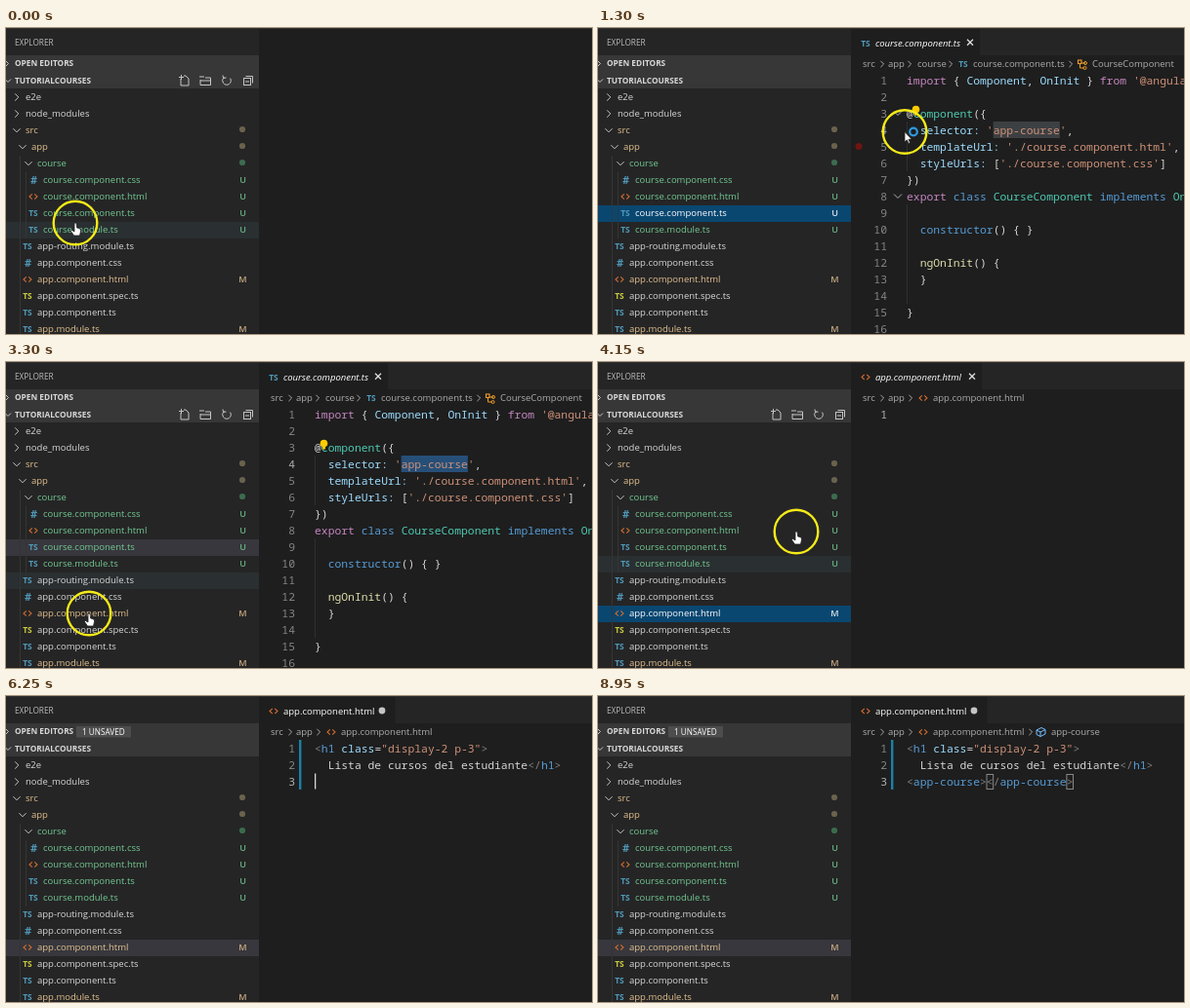
An HTML page with a canvas for the animation above (9000 ms loop, 600 by 314 pixels).

```html
<!DOCTYPE html>
<html lang="es">
<head>
<meta charset="utf-8">
<style>
html, body { margin: 0; width: 100%; height: 100%; overflow: hidden; background: #1e1e1e; }
canvas { display: block; width: 600px; height: 314px; }
</style>
</head>
<body>
<canvas id="stage" width="600" height="314"></canvas>
<script>
const g = document.getElementById('stage').getContext('2d');
const LOOP = 9000, STEP = 50, ROW = 17, SIDE = 259;
const UI = '"Open Sans", "Noto Sans", sans-serif';
const MONO = '"Noto Sans Mono", "DejaVu Sans Mono", monospace';
const PITCH = 6.82, CODE_X = 316;
const GREEN = '#73c991', AMBER = '#e2c08d', PLAIN = '#d8d8d8', BLUE = '#519aba', ORANGE = '#d06c2f';

// When things happen, in ms
const T = { pickCourse: 500, openCourse: 750, select: 2200, openApp: 3550, focusApp: 4650,
            paste: 5800, tagName: 6700, expand: 6950, end: 7150 };
const CLICKS = [450, 2200, 2400, 3500, 4650, 4950];
const PATH = [[0, 71, 200], [350, 74, 190], [800, 78, 190], [1300, 314, 106.5], [1900, 452, 104],
              [2750, 452, 104], [3250, 85, 258], [3700, 85, 258], [4150, 203, 174], [4600, 342, 76], [LOOP, 342, 76]];

// kind, indent x, name, colour, git mark
const TREE = [
  ['closed', 11, 'e2e', PLAIN], ['closed', 11, 'node_modules', PLAIN],
  ['open', 11, 'src', AMBER, '#6b624d'], ['open', 17, 'app', AMBER, '#6b624d'], ['open', 23, 'course', GREEN, '#3c6b4e'],
  ['#', 28, 'course.component.css', GREEN, 'U'], ['<>', 28, 'course.component.html', GREEN, 'U'],
  ['TS', 28, 'course.component.ts', GREEN, 'U'], ['TS', 28, 'course.module.ts', GREEN, 'U'],
  ['TS', 22, 'app-routing.module.ts', PLAIN], ['#', 22, 'app.component.css', PLAIN],
  ['<>', 22, 'app.component.html', AMBER, 'M'], ['spec', 22, 'app.component.spec.ts', PLAIN],
  ['TS', 22, 'app.component.ts', PLAIN], ['TS', 22, 'app.module.ts', AMBER, 'M'],
];
const COURSE_ROW = 7, APP_ROW = 11;

const INK = { p: '#d4d4d4', k: '#c586c0', b: '#569cd6', v: '#9cdcfe', s: '#ce9178', t: '#4ec9b0', f: '#dcdcaa', g: '#808080' };
// Each line alternates ink key and text
const COURSE_CODE = [
  ['k', 'import', 'p', ' { ', 'v', 'Component', 'p', ', ', 'v', 'OnInit', 'p', ' } ', 'k', 'from', 's', " '@angular/core';"],
  [],
  ['p', '@', 't', 'Component', 'p', '({'],
  ['v', '  selector:', 's', " 'app-course'", 'p', ','],
  ['v', '  templateUrl:', 's', " './course.component.html'", 'p', ','],
  ['v', '  styleUrls:', 'p', ' [', 's', "'./course.component.css'", 'p', ']'],
  ['p', '})'],
  ['k', 'export', 'b', ' class', 't', ' CourseComponent', 'b', ' implements', 't', ' OnInit', 'p', ' {'],
  [],
  ['b', '  constructor', 'p', '() { }'],
  [],
  ['f', '  ngOnInit', 'p', '() {'],
  ['p', '  }'],
  [],
  ['p', '}'],
  [],
];
const HEADING = [
  ['g', '<', 'b', 'h1', 'v', ' class', 'p', '=', 's', '"display-2 p-3"', 'g', '>'],
  ['p', '  Lista de cursos del estudiante', 'g', '</', 'b', 'h1', 'g', '>'],
];
const TAG = ['g', '<', 'b', 'app-course', 'g', '></', 'b', 'app-course', 'g', '>'];

const col = n => CODE_X + n * PITCH;
const lineY = n => 53.5 + (n - 1) * ROW;

function rect(x, y, w, h, color) {
  g.fillStyle = color;
  g.fillRect(x, y, w, h);
}
function text(s, x, y, color, size = 9.5, style = '500', family = UI, align = 'left') {
  g.font = `${style} ${size}px ${family}`;
  g.textAlign = align;
  g.textBaseline = 'alphabetic';
  g.fillStyle = color;
  g.fillText(s, x, y + size * 0.36);
}
function line(points, color, width = 1) {
  g.beginPath();
  points.forEach(([x, y], i) => i ? g.lineTo(x, y) : g.moveTo(x, y));
  g.strokeStyle = color;
  g.lineWidth = width;
  g.stroke();
}
function circle(x, y, r, fill, stroke, width = 1) {
  g.beginPath();
  g.arc(x, y, r, 0, Math.PI * 2);
  if (fill) { g.fillStyle = fill; g.fill(); }
  if (stroke) { g.strokeStyle = stroke; g.lineWidth = width; g.stroke(); }
}
function chevron(x, y, open, color = '#c5c5c5', s = 3.6) {
  line(open ? [[x - s, y - s / 2], [x, y + s / 2], [x + s, y - s / 2]]
            : [[x - s / 2, y - s], [x + s / 2, y], [x - s / 2, y + s]], color);
}
function fileIcon(kind, x, y) {
  if (kind === '<>') {
    line([[x - 1.2, y - 2.7], [x - 4, y], [x - 1.2, y + 2.7]], ORANGE, 1.1);
    line([[x + 1.2, y - 2.7], [x + 4, y], [x + 1.2, y + 2.7]], ORANGE, 1.1);
  } else if (kind === '#') {
    text('#', x + 0.5, y, BLUE, 11, 'bold', UI, 'center');
  } else {
    text('TS', x, y, kind === 'spec' ? '#cbcb41' : BLUE, 8.4, 'bold', UI, 'center');
  }
}

function cursorAt(t) {
  const i = Math.max(1, PATH.findIndex(p => p[0] >= t));
  const [a, x0, y0] = PATH[i - 1], [b, x1, y1] = PATH[i];
  const k = (t - a) / (b - a);
  return { x: x0 + (x1 - x0) * k, y: y0 + (y1 - y0) * k };
}

function toolbar() {
  const c = '#c5c5c5', y = 54;
  line([[179, y - 2], [179, y + 5], [187, y + 5], [187, y - 2], [184, y - 5], [182, y - 5]], c);
  line([[177, y - 3.5], [182, y - 3.5]], c);
  line([[179.5, y - 6], [179.5, y - 1]], c);
  line([[199, y - 1], [199, y + 4.5], [209.5, y + 4.5], [209.5, y - 3], [204, y - 3]], c);
  line([[199, y], [209.5, y]], c);
  line([[198, y - 4], [203, y - 4]], c);
  g.beginPath();
  g.arc(226, y, 4.3, -0.6, Math.PI * 1.3);
  g.stroke();
  line([[222, y - 5.5], [222.5, y - 2.5], [225.5, y - 3]], c);
  g.strokeRect(243.5, y - 2.5, 7, 7);
  line([[245.5, y - 4.5], [252.5, y - 4.5], [252.5, y + 2.5]], c);
  line([[245, y + 1], [249, y + 1]], c);
}

function sidebar(t, pos) {
  rect(0, 0, SIDE, 314, '#252526');
  text('EXPLORER', 9, 15, '#bbbbbb', 8.25);
  rect(0, 28, SIDE, 34, '#373738');
  chevron(1, 36.5, false, '#c5c5c5', 3);
  text('OPEN EDITORS', 9, 36.5, PLAIN, 8.3, 'bold');
  chevron(2, 54, true, '#c5c5c5', 3);
  text('TUTORIALCOURSES', 9, 54, PLAIN, 8.3, 'bold');
  if (t >= T.paste) {
    rect(72, 31, 56, 11.5, '#4d4d4d');
    text('1 UNSAVED', 78, 36.8, '#ffffff', 8.2);
  }
  if (pos.x < SIDE) toolbar();

  const past = cursorAt(Math.max(0, t - 180));
  const hover = pos.x < SIDE ? Math.floor((past.y - 62.5) / ROW) : -1;
  const picked = t < T.pickCourse ? -1 : t < T.openApp ? COURSE_ROW : APP_ROW;
  const focused = picked === COURSE_ROW ? t < T.select : t < T.focusApp;

  TREE.forEach(([kind, x, name, color, mark], i) => {
    const y = 71 + i * ROW;
    if (i === picked) rect(0, y - 8, SIDE, ROW, focused ? '#094771' : '#37373d');
    else if (i === hover) rect(0, y - 8, SIDE, ROW, '#2a2f31');
    if (i > 3) rect(14, y - 8, 1, ROW, '#353536');
    if (i > 4 && i < 9) rect(20, y - 8, 1, ROW, '#353536');
    const ink = i === picked && focused ? '#ffffff' : color;
    if (kind === 'open' || kind === 'closed') {
      chevron(x, y, kind === 'open');
      text(name, x + 9, y, color);
      if (mark) circle(242, y - 1, 3.1, mark);
    } else {
      fileIcon(kind, x, y);
      text(name, x + 10, y, ink);
      if (mark) {
        g.globalAlpha = 0.85;
        text(mark, 242.5, y, ink, 9, '600', UI, 'center');
        g.globalAlpha = 1;
      }
    }
  });
}

function tab(kind, name, right, style, dirty) {
  rect(SIDE, 1, 600 - SIDE, 27, '#252526');
  rect(SIDE, 1, right - SIDE, 28, '#1e1e1e');
  fileIcon(kind, 274, 15.5);
  text(name, 284, 15.5, '#ffffff', 9.5, style + ' 500');
  const x = right - 10;
  if (dirty) return circle(385, 15, 3.4, '#c5c5c5');
  line([[x - 3, 11.7], [x + 3, 17.7]], '#e0e0e0', 1.3);
  line([[x + 3, 11.7], [x - 3, 17.7]], '#e0e0e0', 1.3);
}
function crumbs(labels, chevrons) {
  labels.forEach(([s, x]) => text(s, x, 37, '#adadad'));
  chevrons.forEach(x => chevron(x, 37, false, '#a9a9a9', 3.2));
}
function codeLine(tokens, n) {
  let at = 0;
  for (let i = 0; i < tokens.length; i += 2) {
    text(tokens[i + 1], col(at), lineY(n), INK[tokens[i]], PITCH / 0.6, '', MONO);
    at += tokens[i + 1].length;
  }
}
function code(lines, active) {
  lines.forEach((tokens, i) => {
    text(i + 1, 296, lineY(i + 1), i + 1 === active ? '#b0b0b0' : '#858585', PITCH / 0.6, '', MONO, 'right');
    codeLine(tokens, i + 1);
  });
}
function caret(n, at, since, t) {
  if ((t - since) % 1000 < 500) rect(col(at), lineY(n) - 8, 1.3, 16, '#d8d8d8');
}

function courseEditor(t, pos) {
  tab('TS', 'course.component.ts', 391, 'italic');
  crumbs([['src', 271], ['app', 297], ['course', 327], ['course.component.ts', 384], ['CourseComponent', 506]],
         [291, 319, 361, 484]);
  fileIcon('TS', 374, 37);
  const c = '#ee9d28';
  g.strokeStyle = c;
  g.lineWidth = 1.1;
  g.strokeRect(491.5, 33, 3.5, 3.5);
  line([[495, 36], [499, 36]], c);
  line([[493.5, 37], [493.5, 41], [497.5, 41]], c);
  circle(499, 36, 1.5, null, c);
  circle(498.5, 41, 1.5, null, c);

  const selected = t >= T.select;
  rect(col(13), lineY(4) - 8.5, 10 * PITCH, ROW, selected ? '#264f78' : '#3d4043');
  rect(CODE_X, lineY(4) - 8.5, 1, ROW * 3, '#303030');
  rect(CODE_X, lineY(9) - 8.5, 1, ROW * 6, '#303030');
  code(COURSE_CODE, 4);
  if (selected) caret(4, 23, T.select + 200, t);
  if (pos.x > SIDE && pos.x < 400) {
    chevron(307, lineY(3), true, '#b0b0b0', 4);
    chevron(307, lineY(8), true, '#b0b0b0', 4);
    circle(267, lineY(5), 3.5, '#6e1512');
  }
  circle(325.5, 83.5, 3.8, '#ffcc00');
  rect(324, 86.5, 3, 3, '#ffcc00');
}

function appEditor(t) {
  const dirty = t >= T.paste, tagged = t >= T.expand;
  tab('<>', 'app.component.html', dirty ? 398.5 : 393, dirty ? '' : 'italic', dirty);
  crumbs([['src', 271], ['app', 297], ['app.component.html', 343]], [291, 320]);
  fileIcon('<>', 333, 37);
  if (tagged) {
    crumbs([['app-course', 464]], [443]);
    const c = '#75beff';
    line([[449, 35], [454, 32.5], [458, 34.5], [458, 39], [453, 41.5], [449, 39.5], [449, 35], [453, 37], [458, 34.5]], c);
    line([[453, 37], [453, 41.5]], c);
  }
  const third = tagged ? TAG : t >= T.tagName ? ['p', 'app-course'] : [];
  code(dirty ? [...HEADING, third] : [[]], dirty ? 3 : 1);
  if (t >= T.focusApp) rect(300, 45, 2.4, ROW * (dirty ? 3 : 1), '#1b81a8');
  if (t >= T.end) {
    g.strokeStyle = '#888888';
    g.lineWidth = 1;
    [12, 24].forEach(n => g.strokeRect(col(n) + 0.2, 80.5, PITCH - 0.2, 15));
    caret(3, 25, T.end - 50, t);
  } else if (tagged) caret(3, 12, T.expand, t);
  else if (t >= T.tagName) caret(3, 10, T.tagName, t);
  else if (dirty) caret(3, 0, T.paste, t);
  else if (t >= T.focusApp) caret(1, 0, T.focusApp, t);
}

function shape(points, fill, stroke) {
  g.beginPath();
  points.forEach(([x, y]) => g.lineTo(x, y));
  g.closePath();
  g.fillStyle = fill;
  g.fill();
  g.strokeStyle = stroke;
  g.lineWidth = 0.8;
  g.stroke();
}
function pointer(t, { x, y }) {
  if (t >= T.paste) return;
  const resting = t >= 2150 && t < 2750 || t >= 4600;
  if (!resting) circle(x, y, 22.3, null, '#f4ea18', 2.4);

  CLICKS.forEach(c => {
    const age = t - c;
    if (age < 0 || age >= 400) return;
    g.globalAlpha = 1 - age / 400;
    circle(x + 0.5, y + 1, 5 + age / 200, 'rgba(20,30,190,.35)', '#2030e0', 2);
    g.globalAlpha = 1;
  });

  g.save();
  g.translate(x, y);
  if (x < SIDE) {
    shape([[-1, 0], [1, 0], [1.6, 5], [5, 6], [5.6, 8], [4.5, 13], [-1.5, 13], [-4.5, 8.5], [-3.5, 7.5], [-1, 9]], '#ffffff', '#222222');
  } else if (t >= 4400) {
    line([[-2.5, -5], [2.5, -5]], '#dddddd');
    line([[0, -5], [0, 5]], '#dddddd');
    line([[-2.5, 5], [2.5, 5]], '#dddddd');
  } else {
    shape([[0, 0], [0, 10.5], [2.4, 8.3], [4, 12], [5.6, 11.3], [4, 7.8], [7.2, 7.6]], '#ffffff', '#222222');
    if (t < 1500) circle(9, 0, 3.8, null, '#2f9be0', 2.2);
  }
  g.restore();
}

function draw(t) {
  const pos = cursorAt(t);
  rect(0, 0, 600, 314, '#1e1e1e');
  if (t >= T.openApp) appEditor(t);
  else if (t >= T.openCourse) courseEditor(t, pos);
  sidebar(t, pos);
  rect(0, 0, 600, 1, '#303031');
  pointer(t, pos);
}

const start = performance.now();
function tick() {
  const t = (performance.now() - start) % LOOP;
  draw(Math.floor(t / STEP) * STEP);
  requestAnimationFrame(tick);
}
tick();
</script>
</body>
</html>
```
